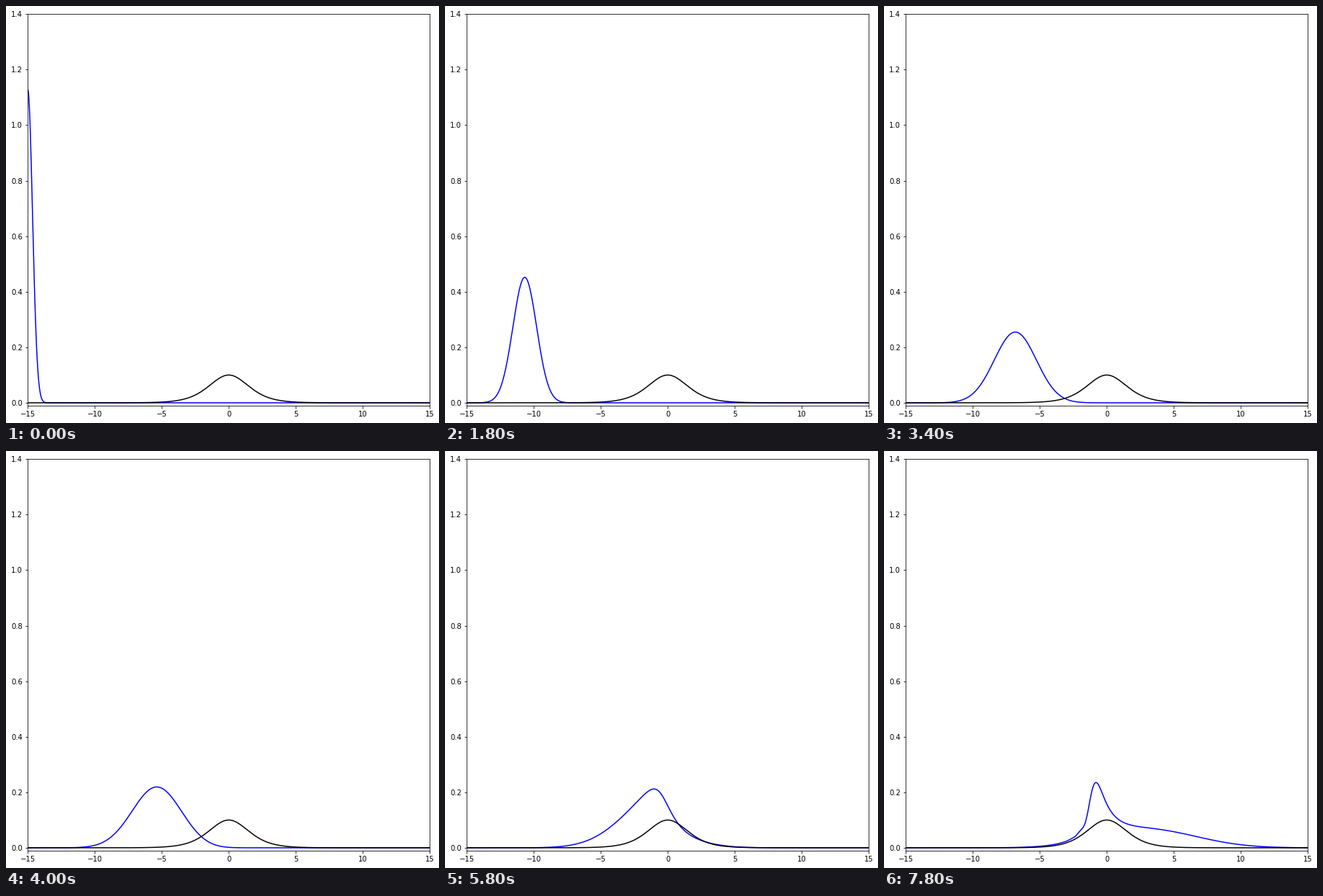
A matplotlib script that plays this animation: 601x579 px, repeating every 8 s.

```python
import numpy as np
import matplotlib.pyplot as plt
from matplotlib.animation import FuncAnimation

# Gaussian wave packet meeting an Eckart barrier (hbar = mass = 1)
W, H, DPI = 601, 579, 72
FRAMES, INTERVAL = 40, 200
FRAME_TIME = 0.06356
STEPS = 64
START, K_MEAN = -15.0, 7.567
BARRIER = 7.0 ** 2 / 2

N, SPAN = 4096, 100.0
x = (np.arange(N) - N // 2) * SPAN / N
k = 2 * np.pi * np.fft.fftfreq(N, SPAN / N)
bump = 1 / np.cosh(x / 2) ** 2


def densities():
    """Split-operator evolution, one density per frame."""
    dt = FRAME_TIME / STEPS
    half_kick = np.exp(-0.5j * dt * BARRIER * bump)
    drift = np.exp(-0.5j * dt * k ** 2)
    psi = (4 / np.pi) ** 0.25 * np.exp(-2 * (x - START) ** 2 + 1j * K_MEAN * x)
    result = []
    for _ in range(FRAMES):
        result.append(np.abs(psi) ** 2)
        for _ in range(STEPS):
            psi = half_kick * np.fft.ifft(drift * np.fft.fft(half_kick * psi))
    return result


rho = densities()

plt.rcParams.update({"font.family": "DejaVu Sans", "font.size": 10})
# The tiny surplus keeps float rounding from losing a pixel.
fig = plt.figure(figsize=((W + 1e-4) / DPI, (H + 1e-4) / DPI), dpi=DPI,
                 facecolor="white")
ax = fig.add_axes([30.2 / W, 24.2 / H, 558 / W, 543.6 / H])
ax.set_xlim(-15, 15)
ax.set_ylim(-0.01, 1.4)

wave, = ax.plot(x, rho[0], color="blue", lw=1.5)
ax.plot(x, 0.1 * bump, color="black", lw=1.5)


def draw(i):
    wave.set_ydata(rho[i])
    return wave,


anim = FuncAnimation(fig, draw, frames=FRAMES, init_func=lambda: draw(0),
                     interval=INTERVAL, repeat=True, repeat_delay=0)
plt.show()
```
